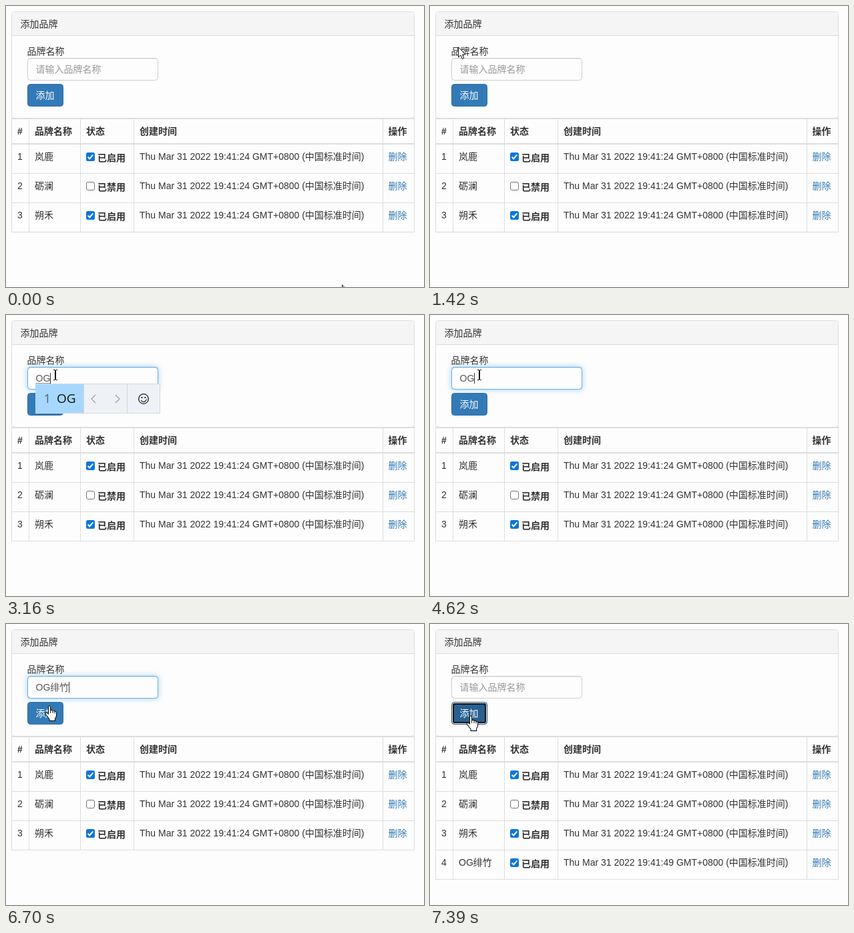
Recreate the animation shown at these times as an HTML page with a canvas. Size 626 by 422 pixels, loop 8 s.

```html
<!DOCTYPE html>
<html lang="zh-CN">
<head>
<meta charset="utf-8">
<title>添加品牌</title>
<style>
html, body { margin: 0; width: 100%; height: 100%; overflow: hidden; background: #fdfdfd; }
canvas { display: block; }
</style>
</head>
<body>
<canvas id="stage" width="626" height="422"></canvas>
<script>
const ctx = document.getElementById('stage').getContext('2d');
const LOOP = 8000, PAGE = '#fdfdfd', LINE = '#ddd', INK = '#333', BLUE = '#337ab7';
const UI = '"Liberation Sans", Arial, "Noto Sans CJK SC", "Noto Sans CJK", sans-serif';
const IME = '"Open Sans", "Noto Sans CJK SC", "Noto Sans CJK", sans-serif';

// Timelines: [start, ...values]
const POINTER = [
  [0, 'arrow', 503, 418], [120, ''], [370, 'arrow', 373, 371], [490, 'arrow', 328, 353],
  [790, 'arrow', 276, 312], [910, 'arrow', 208, 258], [1030, 'arrow', 134, 196],
  [1150, 'hand', 70, 126], [1270, 'beam', 50, 85], [1420, 'arrow', 42, 61],
  [1540, 'beam', 68, 88], [1690, 'beam', 74, 90], [6700, 'hand', 65, 122],
  [6820, 'hand', 61, 148], [6970, 'hand', 61, 137]
];
const TYPED = [
  [0, '', ''], [3040, '', 'O'], [3160, '', 'OG'], [3560, 'OG', ''],
  [4760, 'OG', 'fe'], [4880, 'OG', 'fei'], [5160, 'OG', "fei'z"], [5280, 'OG', "fei'zhu"],
  [5710, 'OG绯竹', ''], [7390, '', '']
];
const CARET = [[0, 0], [1690, 1], [2390, 0], [2790, 1], [4120, 0], [4620, 1], [6270, 0], [6700, 1], [7120, 0]];
const FOCUS = [[0, 0], [1690, 0.15], [1810, 0.4], [1960, 1], [7120, 0.6], [7240, 0]];
const BUTTON = [[0, ''], [1150, 'hover'], [1420, ''], [6820, 'hover'], [7120, 'focus']];
const SINGLES = ['非', '飞', '费', '肥', '飞', '废', '肺'];
const PHRASES = ['绯竹', '非竹', '回(huí)竹', '非', '飞', '费', '肥'];
const ROWS = [['岚鹿', true, 24], ['砺澜', false, 24], ['朔禾', true, 24], ['OG绯竹', true, 49]];

const at = (list, t) => list.filter(e => e[0] <= t).pop();

function rect(x, y, w, h, color) {
  ctx.fillStyle = color;
  ctx.fillRect(x, y, w, h);
}

function text(s, x, y, color = INK, font = '14px ' + UI) {
  ctx.font = font;
  ctx.fillStyle = color;
  ctx.fillText(s, x, y);
  return ctx.measureText(s).width;
}

const bold = (s, x, y) => text(s, x, y, INK, 'bold 14px ' + UI);

function round(x, y, w, h, r, fill, stroke, lw = 1) {
  ctx.beginPath();
  ctx.roundRect(x, y, w, h, r);
  if (fill) { ctx.fillStyle = fill; ctx.fill(); }
  if (stroke) { ctx.strokeStyle = stroke; ctx.lineWidth = lw; ctx.stroke(); }
}

function path(points, color, lw, fill, close) {
  ctx.beginPath();
  points.forEach(([x, y]) => ctx.lineTo(x, y));
  if (close) ctx.closePath();
  if (fill) { ctx.fillStyle = fill; ctx.fill(); }
  ctx.strokeStyle = color;
  ctx.lineWidth = lw;
  ctx.stroke();
}

function panel() {
  round(8.5, 8.5, 603, 160, 4, PAGE, LINE);
  round(9, 9, 602, 35, [3, 3, 0, 0], '#f5f5f5');
  rect(9, 44, 602, 1, LINE);
  text('添加品牌', 21.5, 32);
  text('品牌名称', 31.5, 73);
}

function input(t) {
  const focus = at(FOCUS, t)[1];
  const glow = Math.max(0, focus - 0.4);
  if (glow) {
    ctx.save();
    ctx.beginPath();
    ctx.rect(0, 0, 626, 422);
    ctx.roundRect(32, 78, 196, 34, 4);
    ctx.clip('evenodd');
    ctx.shadowColor = `rgba(102,175,233,${glow})`;
    ctx.shadowBlur = 8;
    round(32, 78, 196, 34, 4, '#66afe9');
    ctx.restore();
  }
  round(32.5, 78.5, 195, 33, 4, PAGE, '#ccc');
  rect(34, 79, 192, 1, 'rgba(0,0,0,.06)');
  ctx.globalAlpha = focus;
  round(32.5, 78.5, 195, 33, 4, null, '#66afe9');
  ctx.globalAlpha = 1;

  const [, done, comp] = at(TYPED, t);
  const value = done + comp;
  if (value) text(value, 44.5, 100, '#555');
  else text('请输入品牌名称', 44.5, 100, '#999');
  ctx.font = '14px ' + UI;
  const width = s => ctx.measureText(s).width;
  const end = 45 + width(value);
  const start = 45 + width(done);
  if (comp) for (let x = Math.round(start); x < end; x += 2) rect(x, 102, 1, 1, '#444');
  if (at(CARET, t)[1]) rect(Math.floor(end), 87, 1, 16, '#333');
  return { comp, x: Math.floor(start) - 1 };
}

function button(t) {
  const state = at(BUTTON, t)[1];
  round(32.5, 117.5, 53, 33, 4, state ? '#286090' : BLUE, state ? '#204d74' : '#2e6da4');
  if (state === 'focus') {
    round(33.5, 118.5, 51, 31, 3, null, '#fff');
    round(35, 120, 48, 28, 2.5, null, '#101010', 2);
  }
  text('添加', 44.4, 139, '#fff');
}

function checkbox(x, y, on) {
  if (!on) return round(x + 0.5, y + 0.5, 12, 12, 2.5, '#fff', '#767676');
  round(x, y, 13, 13, 2.5, '#0b76d8');
  path([[x + 2.6, y + 6.6], [x + 5.2, y + 9.4], [x + 10.4, y + 3.4]], '#fff', 2);
}

function table(count) {
  const bottom = 207 + count * 44;
  rect(8, 168, 604, 2, LINE);
  rect(8, 206, 604, 2, LINE);
  [8, 34, 111, 191, 564, 611].forEach(x => rect(x, 168, 1, bottom - 167, LINE));
  bold('#', 17, 193);
  bold('品牌名称', 43, 193);
  bold('状态', 120, 193);
  bold('创建时间', 200, 193);
  bold('操作', 572.5, 193);
  ROWS.slice(0, count).forEach(([name, on, sec], i) => {
    const y = 207 + i * 44;
    rect(8, y + 44, 604, 1, LINE);
    text(i + 1, 17, y + 24);
    text(name, 43, y + 24);
    checkbox(120, y + 13, on);
    bold(on ? '已启用' : '已禁用', 137, y + 26);
    text(`Thu Mar 31 2022 19:41:${sec} GMT+0800 (中国标准时间)`, 200, y + 24);
    text('删除', 572.5, y + 24, BLUE);
  });
}

function chevron(x, dir) {
  path([[x + 3 * dir, 120], [x - 3 * dir, 126], [x + 3 * dir, 132]], '#999', 1.1);
}

function candidates({ comp, x }) {
  if (!comp) return;
  const latin = comp[0] === 'O';
  const words = latin ? [comp] : comp.length > 3 ? PHRASES : SINGLES;
  const font = (latin ? 19 : 18) + 'px ' + IME;
  ctx.font = font;
  const cells = words.map(w => ctx.measureText(w).width + 43.3);
  const end = Math.round(x + cells.reduce((a, b) => a + b, 0));
  const back = latin ? '#eef2f6' : '#f3f3f3';
  rect(x, 103, end + 115 - x, 45, '#d5d8dc');
  rect(x + 1, 104, end + 113 - x, 43, back);
  rect(x, 104, Math.round(cells[0]), 43, '#a6d8ff');
  let left = x;
  words.forEach((w, i) => {
    text(i + 1, left + 12.5, 132, '#5c6166', '19px ' + IME);
    text(w, left + 32, 132, '#111', font);
    left += cells[i];
  });
  rect(end, 104, 1, 43, '#d2d5d8');
  rect(end + 65, 104, 1, 43, '#d2d5d8');
  chevron(end + 15, 1);
  chevron(end + 51, -1);
  const fx = end + 90;
  ctx.strokeStyle = '#222';
  ctx.lineWidth = 1.3;
  ctx.beginPath();
  ctx.arc(fx, 126, 7.3, 0, 7);
  ctx.moveTo(fx + 3.6, 128);
  ctx.arc(fx, 126.5, 4, 0.35, Math.PI - 0.35);
  ctx.stroke();
  rect(fx - 3.5, 123, 2, 2, '#222');
  rect(fx + 1.5, 123, 2, 2, '#222');
}

const SHAPES = {
  arrow() {
    path([[0.5, 0.8], [0.5, 16], [4, 12.8], [6.4, 18.3], [8.8, 17.2], [6.5, 11.9], [11.2, 11.9]],
      '#111', 1, '#fff', true);
  },
  beam() {
    rect(-1, -7, 2, 14, '#111');
    rect(-3, -8, 3, 1, '#111');
    rect(1, -8, 2, 1, '#111');
    rect(-3, 7, 3, 1, '#111');
    rect(1, 7, 2, 1, '#111');
  },
  hand() {
    ctx.beginPath();
    ctx.moveTo(-1.5, 13);
    ctx.lineTo(-1.5, 2);
    ctx.quadraticCurveTo(0, -0.6, 1.6, 2);
    ctx.lineTo(1.6, 7.5);
    ctx.quadraticCurveTo(4.5, 6.4, 5, 8.4);
    ctx.quadraticCurveTo(7.5, 7.3, 8, 9.4);
    ctx.quadraticCurveTo(10.6, 8.8, 10.7, 11.5);
    ctx.lineTo(10.5, 16);
    ctx.quadraticCurveTo(10, 18, 8.6, 20);
    ctx.lineTo(8.6, 23.4);
    ctx.lineTo(0, 23.4);
    ctx.lineTo(0, 21);
    ctx.lineTo(-5.6, 13.6);
    ctx.quadraticCurveTo(-6.6, 10.6, -3.6, 11.2);
    ctx.closePath();
    ctx.fillStyle = '#fff';
    ctx.fill();
    ctx.strokeStyle = '#111';
    ctx.lineWidth = 1.1;
    ctx.stroke();
    path([[1.6, 7.5], [1.6, 12]], '#111', 1);
    path([[5, 8.4], [5, 12]], '#111', 1);
    path([[8, 9.4], [8, 12.5]], '#111', 1);
  }
};

function pointer(t) {
  const [, kind, x, y] = at(POINTER, t);
  if (!kind) return;
  ctx.save();
  ctx.translate(x, y);
  SHAPES[kind]();
  ctx.restore();
}

function draw() {
  const t = performance.now() % LOOP;
  rect(0, 0, 626, 422, PAGE);
  panel();
  const field = input(t);
  button(t);
  table(t < 7390 ? 3 : 4);
  candidates(field);
  pointer(t);
  requestAnimationFrame(draw);
}
draw();
</script>
</body>
</html>
```
